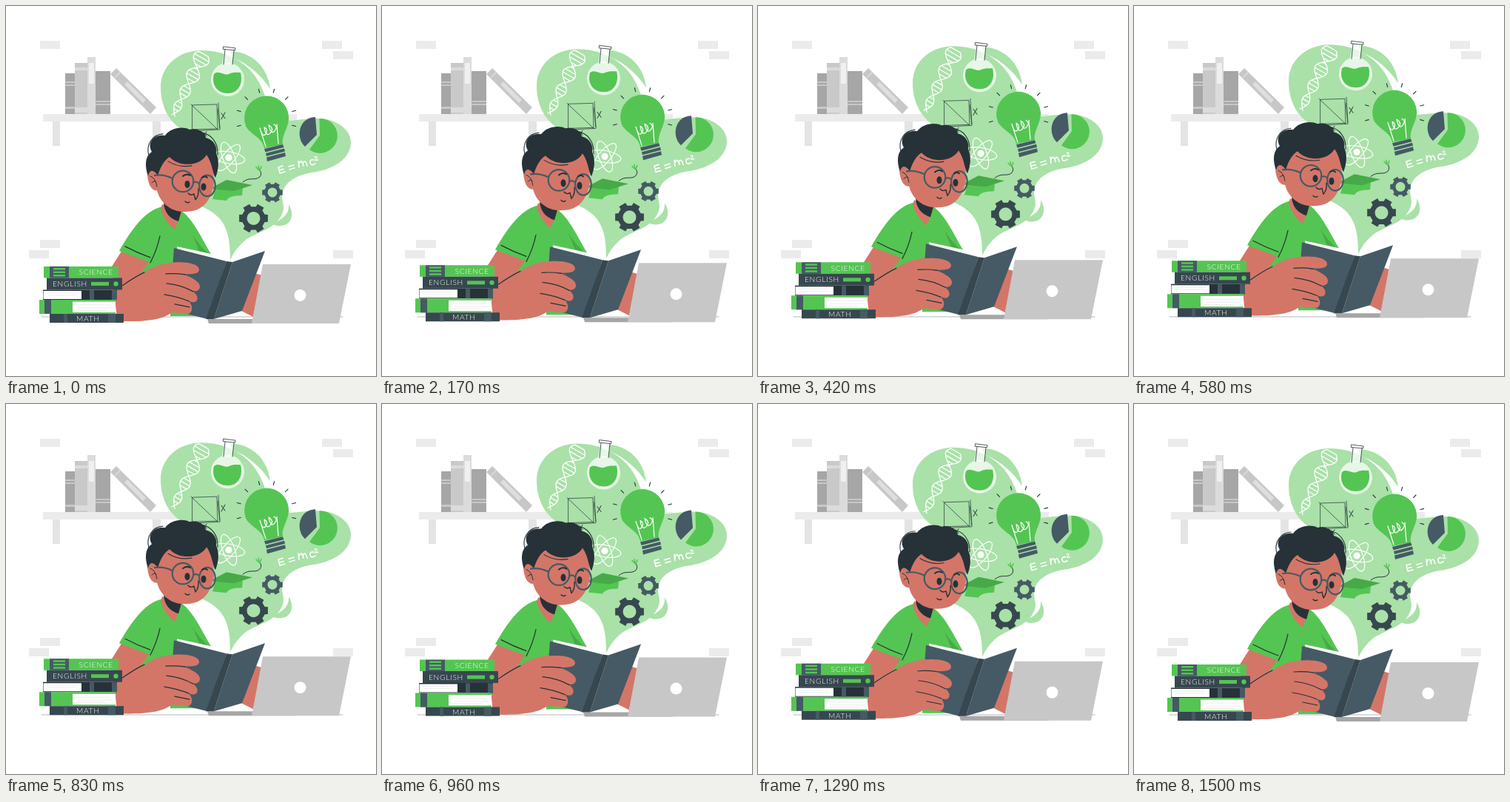
Animation, 500 px wide and 500 px high, one loop 1540 ms. Source, as an HTML page:

```html
<!DOCTYPE html>
<html lang="en">
<head>
<meta charset="utf-8">
<style>
  html, body { margin: 0; width: 100%; height: 100%; overflow: hidden; background: #fff; }
  svg { display: block; width: 100vw; height: 100vh; }
  .line { fill: none; stroke-linecap: round; stroke-linejoin: round; }
  .ink { stroke: #263238; }
  .chalk { stroke: #fff; }
  .slate { fill: #455a64; }
  .deep { fill: #37474f; }
  .night { fill: #263238; }
  .green { fill: #54c552; }
  .mint { fill: #a9e1a8; }
  .skin { fill: #d37668; }
  text { font: 300 10.2px Lato, sans-serif; fill: #fff; letter-spacing: .7px; }
</style>
</head>
<body>
<svg viewBox="0 0 500 500">
  <g id="wall" fill="#ebebeb">
    <path d="M50 146h343v10H50z"/>
    <path fill="#e4e4e4" d="M63 156h10v33H63zM198 156h11v33h-11z"/>
  </g>
  <g id="shelfBooks">
    <path fill="#a6a6a6" d="M80 91h13v55H80zM121 88h20v58h-20z"/>
    <path fill="#c9c9c9" d="M93 77h17v69H93z"/>
    <path fill="#dbdbdb" d="M110 69h11v77h-11zM93 83h17v4H93zM93 137h17v7H93z"/>
    <path fill="#c7c7c7" d="M80 102h13v2H80zM80 106h13v2H80zM80 136h13v3H80zM121 128h20v2h-20zM121 132h20v2h-20zM141 92l8-8 54 53-8 9z"/>
    <path fill="#f0f0f0" d="M112 77h7v28h-7z"/>
    <path fill="#dedede" d="M160 106l4-4 25 25-4 4zM146 97l8-8 1 1-8 8z"/>
  </g>
  <path class="line" stroke="#263238" stroke-width=".35" d="M48 420H455"/>

  <g id="scene">
    <g id="thoughts">
      <path class="mint" d="M303 343C303 308 298 284 262 270L250 172C225 165 209 140 209 110C209 81 233 60 264 60C297 60 322 75 336 94C351 114 352 138 365 150C376 160 393 152 420 152C447 152 466 167 466 184C466 207 442 221 414 225C389 229 374 240 373 257C373 267 378 272 372 283C363 302 340 305 324 316C314 324 309 331 303 343Z"/>
      <path class="mint" d="M303 61C333 62 354 83 357 112C345 94 329 79 307 70ZM382 268C389 279 387 290 379 295C373 298 364 298 359 294C374 289 383 281 382 268Z"/>
      <path id="dna" class="line chalk" stroke-width="1.3"/>

      <circle cx="299.500" cy="99.500" r="22.500" fill="#fff" opacity=".72"/>
      <path fill="#fff" opacity=".72" d="M296 58l12 1-2 20-14 0z"/>
      <path class="green" d="M281 92C288 86 294 95 301 92C307 89 312 90 317 90C321 106 313 118 300 118C286 118 277 107 281 92Z"/>
      <path class="line ink" stroke-width=".8" d="M294 55l16 2-.4 3-16-1.500zM296 59l-2 20M308 60l-2 19"/>

      <path class="line ink" stroke-width=".7" d="M252 134l33-1 1 33-34 1zM250 133l36 34M287 131l2 36-37 2M286 139l3 26"/>
      <path class="line ink" stroke-width="1" d="M291 145l5 7M296 144l-5 9M267 171l4 5M271 170l-4 6"/>

      <g id="atom" class="line chalk" stroke-width="1.2" transform="translate(301 205)"><circle r="4" fill="#fff"/></g>

      <g id="rays" class="line ink" stroke-width="1.1"></g>
      <path class="green" d="M349 192C347 178 330 174 324 162A30 30 0 1 1 382 149C383 164 372 174 374 187Z"/>
      <path class="line chalk" stroke-width="1.200" d="M351 190L343 165Q347 179 351 173T349 164Q351 178 357 172T355 161Q358 175 363 169T362 160M368 186L366 160"/>
      <path class="slate" d="M349 193l25-6 1.500 4-25 6.500zM351 199l25-6.500 1 4-25 6.500zM352 204.500l25-6.500 1 5-25 7z"/>

      <path class="green" d="M424 175L423.500 152A23.500 23.500 0 1 1 410 194Z"/>
      <path class="slate" d="M420 174L404 190C391 178 395 151 418 150Z"/>

      <path class="line chalk" stroke-width="1.600" d="M374 216l-6 2 2 8 7-2M369 222l6-1.500M382 217l7-2M383 221l7-2M396 218l-1-8 1 3q3-6 5 0l1 3-1-3q3-6 5 0l1 3M416 208q-6-1-5 4t7 1"/>
      <path class="line chalk" stroke-width="1.100" d="M417 205q2-3 3 0l-2 4 4-1"/>

      <path id="bigGear" class="deep" fill-rule="evenodd" transform="translate(334.500 287)"/>
      <path id="smallGear" class="slate" fill-rule="evenodd" transform="translate(360 252)"/>

      <path class="green" d="M283 248L320 246 319 256Q301 256 298 263L279 261Z"/>
      <path fill="#47a947" d="M275 247L298 235 333 242 308 250Z"/>
      <path class="line ink" stroke-width="1" d="M320 238C330 230 336 237 343 231Q347 226 342 221"/>
      <path class="line" stroke="#54c552" stroke-width="1.500" d="M342 222l-4-4M342 222l-1-6M343 222l2-5"/>
    </g>

    <g id="reader">
      <path class="skin" d="M157 330L196 344 183 364Q204 347 222 346L240 400 150 424 143 352Z"/>
      <path class="green" d="M211 271C186 277 168 305 153 331L193 346 182 362 222 349V419H275L277 335C265 315 253 288 237 277Z"/>
      <path fill="#47a947" d="M252 309l9 22 13 4Q262 325 252 309Z"/>
      <path class="skin" d="M211 268L209 274Q214 292 228 302Q233 290 238 277Z"/>
      <path class="night" d="M213 265Q214 285 233 291L237 277Z"/>
      <path class="line ink" stroke-width="1.200" d="M161 325Q178 334 195 340M208 311Q204 330 195 347"/>

      <path class="skin" d="M207 200Q201 219 204 249C209 268 225 279 243 278C265 278 277 264 281 240L279 196 222 192Z"/>
      <path class="skin" d="M205 221C196 217 189 224 192 235C194 246 200 251 206 249Z"/>
      <path class="line ink" stroke-width="1" d="M195 230Q202 232 204 244M197 239q4-4 6-1"/>
      <path class="night" d="M192 230C187 215 188 203 197 197C190 184 200 173 215 175C222 165 238 162 248 167C259 164 270 171 270 178C282 181 286 192 284 199C289 210 287 222 283 232C279 226 279 212 271 201C264 215 236 220 221 204C214 208 209 217 205 229C200 221 194 220 192 230Z"/>
      <path class="line ink" stroke-width="1.100" d="M193 202C189 188 197 174 212 173M264 172C277 172 287 185 286 201M219 210Q234 219 251 216"/>

      <g class="line" stroke="#455a64" stroke-width="2.200">
        <circle cx="239" cy="237" r="14.300"/>
        <ellipse cx="272" cy="243" rx="10.800" ry="14.300"/>
        <path d="M253 239q4-3 8 1M225 233Q212 227 201 229"/>
      </g>
      <ellipse class="night" cx="245" cy="241" rx="3.500" ry="5"/>
      <ellipse class="night" cx="267" cy="244.500" rx="3.500" ry="5"/>
      <path class="line ink" stroke-width="2" d="M239 230q5-4 10-1M265 232q4-3 7 0"/>
      <path class="line ink" stroke-width="1.400" d="M246 253Q250 257 254 254L256 262Q261 256 260 247M242 264q2 3 6 1"/>
    </g>

    <path class="skin" d="M336 361L346 364 334 420 318 412Z"/>
    <path fill="#a6a6a6" d="M272 423h121v6H274Z"/>
    <path fill="#c7c7c7" d="M347 349H466L450 429H332Z"/>
    <circle cx="397.500" cy="391" r="8" fill="#fff"/>

    <path fill="#fff" d="M231 325L277 335 298 345 232 330Z"/>
    <path class="slate" d="M227 327L298 345 272 423 221 410ZM306 346L350 331 319 412 281 423Z"/>
    <path class="deep" d="M298 345L306 346 281 423 270 423Z"/>

    <path class="skin" d="M148 384L183 362Q202 349 220 347C239 345 260 347 261 356C261 362 253 363 237 362Q252 366 260 374C265 381 260 387 252 385Q262 393 257 399Q253 402 246 398C254 405 252 415 246 416Q236 416 224 414C211 425 183 427 150 426Z"/>
    <path class="line ink" stroke-width="1.200" d="M157 378Q176 365 187 360M216 362Q230 361 242 363M217 375Q237 377 253 386M214 390Q233 393 247 399M228 403l20 4"/>

    <g id="stack">
      <path class="green" d="M51 352H152V367.500H51Z"/>
      <path class="slate" d="M59 352h26v15.500H59Z"/>
      <path class="green" d="M64 354h16v2.500H64zM64 358.500h16v2.500H64zM64 363h16v2.500H64Z"/>
      <text x="98.500" y="363.500">SCIENCE</text>
      <path class="deep" d="M55 367.500H157V383.500H55Z"/>
      <path class="green" d="M115 373h24v5h-24Z"/>
      <circle class="green" cx="148.500" cy="375.500" r="3.200"/>
      <text x="63" y="379">ENGLISH</text>
      <path class="night" d="M50 383.500H150V397H50Z"/>
      <path fill="#fff" d="M50.500 385H102V396H50.500Z"/>
      <path class="slate" d="M113 384h6v13h-6zM143 384h7v13h-7Z"/>
      <path class="green" d="M45 397H148V416H45Z"/>
      <path class="slate" d="M52 397h9v19h-9Z"/>
      <path fill="#fff" d="M90 399.500H148V414H90Z"/>
      <path class="line" stroke="#d8d8d8" stroke-width=".5" d="M55 388h42M57 391h38M94 404h48M98 408h46M95 411h40"/>
      <path class="deep" d="M59 416H159V428H59Z"/>
      <path class="slate" d="M78 416h5v12h-5zM138 416h10v12h-10Z"/>
      <text x="95" y="426">MATH</text>
    </g>
  </g>
</svg>
<script>
  const $ = id => document.getElementById(id);
  const LOOP = 1540, LIFT = 8.3, LEAD = 55;

  function add(parent, tag, attrs) {
    const node = document.createElementNS('http://www.w3.org/2000/svg', tag);
    for (const key in attrs) node.setAttribute(key, attrs[key]);
    $(parent).append(node);
  }

  for (const [x, y] of [[46, 47], [427, 47], [442, 61], [46, 316], [31, 330], [442, 330]])
    add('wall', 'rect', { x, y, width: 27, height: 11 });

  for (const angle of [10, 70, 130])
    add('atom', 'ellipse', { rx: 22, ry: 8, transform: `rotate(${angle})` });

  for (let angle = 165; angle <= 375; angle += 30)
    add('rays', 'path', { d: 'M36 0h5', transform: `translate(352 152) rotate(${angle})` });

  // Double helix that widens toward the top
  function helix(steps) {
    const point = (s, side) => {
      const sway = side * (4 + 8 * s) * Math.sin(Math.PI * (4 * s ** 0.9 - 0.2));
      return `${226 + 41 * s + sway * 0.87} ${148 - 83 * s + sway * 0.5}`;
    };
    let left = '', right = '', rungs = '';
    for (let i = 0; i <= steps; i++) {
      const s = i / steps, a = point(s, 1), b = point(s, -1);
      left += (i ? 'L' : 'M') + a;
      right += (i ? 'L' : 'M') + b;
      if (i % 4 === 2) rungs += `M${a}L${b}`;
    }
    return left + right + rungs;
  }
  $('dna').setAttribute('d', helix(66));

  function gear(outer, root, hole) {
    const teeth = 6;
    let d = '';
    for (let i = 0; i < teeth; i++)
      for (const [offset, r] of [[-0.32, root], [-0.25, outer], [0.25, outer], [0.32, root]]) {
        const a = i * 2 * Math.PI / teeth + offset;
        d += (d ? 'L' : 'M') + r * Math.cos(a) + ' ' + r * Math.sin(a);
      }
    return `${d}ZM${hole} 0A${hole} ${hole} 0 1 0 ${-hole} 0A${hole} ${hole} 0 1 0 ${hole} 0Z`;
  }
  $('bigGear').setAttribute('d', gear(20, 16, 9));
  $('smallGear').setAttribute('d', gear(14.2, 11.3, 6.5));

  function draw(now) {
    const phase = Math.PI * (now % LOOP + LEAD) / LOOP;
    $('scene').setAttribute('transform', `translate(0 ${-LIFT * Math.sin(phase) ** 2})`);
    requestAnimationFrame(draw);
  }
  draw(performance.now());
</script>
</body>
</html>
```
